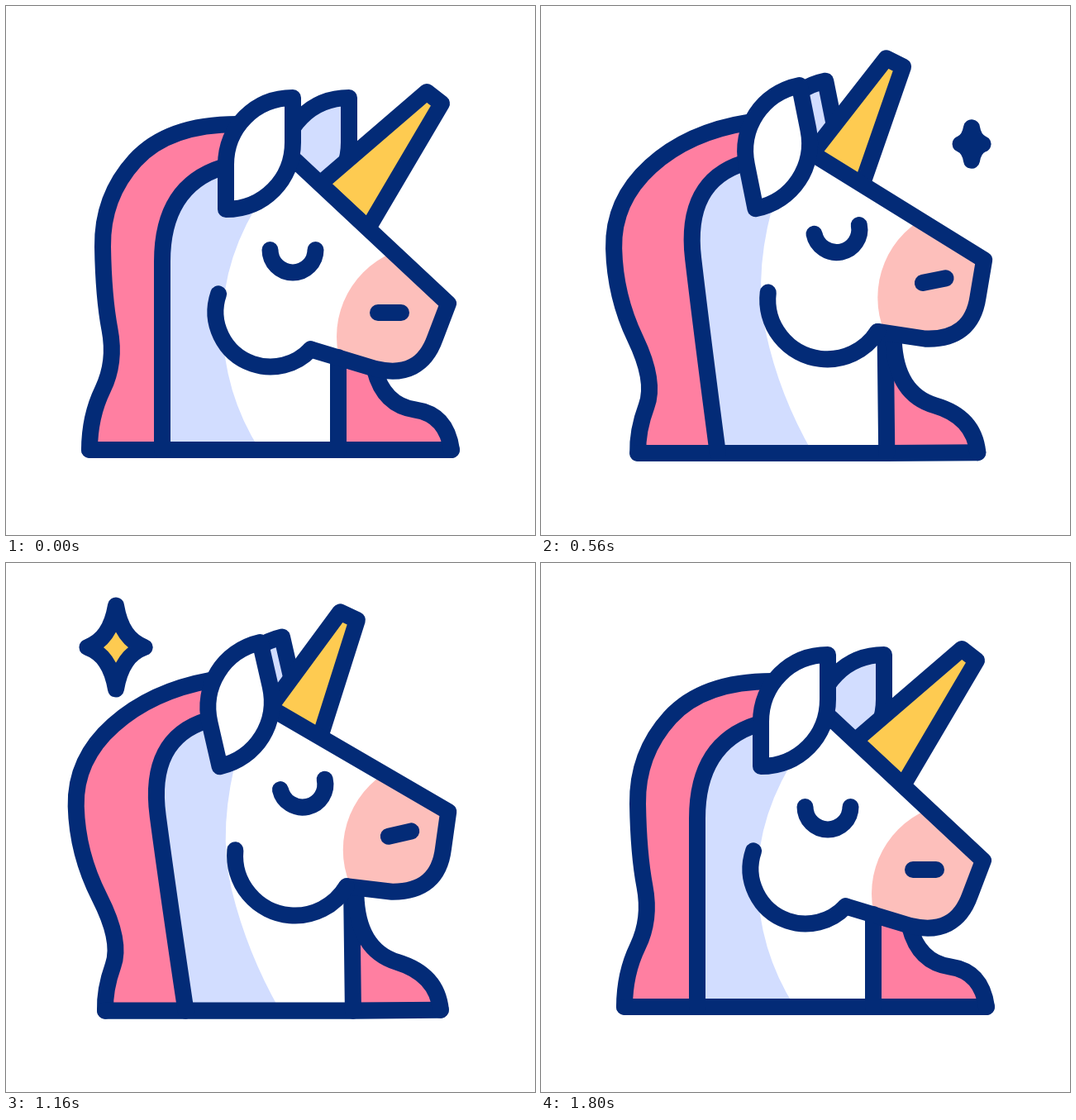
Recreate the animation shown at these times as an HTML page with a canvas. Size 640x640 px, loop 2400 ms.

```html
<!DOCTYPE html>
<html lang="en">
<head>
<meta charset="utf-8">
<title>Unicorn</title>
<style>
  html, body { margin: 0; width: 100%; height: 100%; overflow: hidden; background: #fff; }
  canvas { display: block; width: 640px; height: 640px; }
</style>
</head>
<body>
<canvas id="stage"></canvas>
<script>
const LOOP = 2400, STEP = 20, TILT = -14;
const NAVY = '#032b77', PINK = '#ff7fa1', ICE = '#d2ddff',
      BLUSH = '#fdbfbb', GOLD = '#fecb51', WHITE = '#fff';

// Soft parts: control points as x, y and how far each moves when the head is up.
const MANE = [[280, 143, -35, 0], [196, 143, -21, 14], [116, 231, -35, 8], [118, 352, -34, 0],
              [133, 431, 8, 29], [101, 497, 20, 21], [101, 537, 21, 5]];
const NECK = [[189, 537, 31, 5], [189, 400, 8, 0], [189, 218, -19, -5], [262, 195, -20, -4]];
const SHADE = [[314, 225, -34, -3], [261, 303, -7, 19], [263, 468, 31, 4], [307, 537, 26, 4]];
const LOCK = [[446, 440, -25, -42], [457, 483, -35, -16], [533, 494, -13, 4], [539, 537, -15, 4]];
const THROAT = [[402, 425, 17, -34], [402, 537, 19, 5]];

// Rigid parts
const LEAF = new Path2D('M347 111V165C347 210 312 246 266 246V192C266 147 301 111 347 111Z');
const HORN = new Path2D('M380 215L509 104L527 118L438 269Z');
const EYE = new Path2D('M319.5 295A27.5 27.5 0 0 0 374.5 295');
const NOSTRIL = new Path2D('M450 371H478');
const MUZZLE = new Path2D('M350 187L535 360L519 402Q501 452 447 439');

const canvas = document.getElementById('stage');
const ctx = canvas.getContext('2d');
const dpr = window.devicePixelRatio || 1;
canvas.width = canvas.height = 640 * dpr;

const lerp = (a, b, p) => a + (b - a) * p;
const rad = deg => deg * Math.PI / 180;
const ease = u => (1 - Math.cos(Math.PI * Math.min(1, Math.max(0, u)))) / 2;

// Eases up over `rise` ms, holds, then eases down over `fall` ms.
const swell = (t, rise, hold, fall) =>
  t < rise + hold ? ease(t / rise) : 1 - ease((t - rise - hold) / fall);

const moved = (pts, p) => pts.map(([x, y, dx, dy]) => [x + dx * p, y + dy * p]);

// Smooth chain of quadratics; continues `path` with a line if one is given.
function curve(pts, path = new Path2D()) {
  const last = pts.length - 1;
  path.lineTo(...pts[0]);
  for (let i = 1; i < last; i++) {
    const [x, y] = pts[i], [nx, ny] = pts[i + 1];
    if (i === last - 1) path.quadraticCurveTo(x, y, nx, ny);
    else path.quadraticCurveTo(x, y, (x + nx) / 2, (y + ny) / 2);
  }
  return path;
}

function poly(pts, path = new Path2D()) {
  for (const pt of pts) path.lineTo(...pt);
  return path;
}

function paint(path, fill, line = true) {
  if (fill) { ctx.fillStyle = fill; ctx.fill(path); }
  if (line) ctx.stroke(path);
}

// Tilts with the head about a pivot that travels between two points.
function tilted(p, from, to) {
  return new DOMMatrix()
    .translate(lerp(from[0], to[0], p), lerp(from[1], to[1], p))
    .rotate(TILT * p)
    .translate(-from[0], -from[1]);
}

function place(path, matrix) {
  const out = new Path2D();
  out.addPath(path, matrix);
  return out;
}

function star(age, x, y) {
  if (age < -20 || age > 720) return;
  const s = lerp(0.14, 1, swell(age, 380, 0, 340));
  const tip = i => [37 * s * Math.sin(i * Math.PI / 2), -54 * s * Math.cos(i * Math.PI / 2)];
  const path = new Path2D();
  for (let i = 0; i < 4; i++) {
    const [ax, ay] = tip(i), [bx, by] = tip(i + 1);
    const at = (a, b) => [x + a * ax + b * bx, y + a * ay + b * by];
    path.lineTo(...at(1, 0));
    path.bezierCurveTo(...at(0.45, 0.14), ...at(0.14, 0.45), ...at(0, 1));
  }
  path.closePath();
  paint(path, GOLD);
}

function unicorn(p) {
  const [mane, neck, shade, lock, throat] =
    [MANE, NECK, SHADE, LOCK, THROAT].map(pts => moved(pts, p));

  // The jaw runs into the lower end of the cheek arc.
  const r = lerp(66.5, 73, p), cx = lerp(320, 352, p), cy = lerp(370, 353, p);
  const from = rad(199 - 15 * p), to = rad(43 - 13 * p);
  const cheek = new Path2D();
  cheek.arc(cx, cy, r, from, to, true);
  const jaw = [cx + r * Math.cos(to), cy + r * Math.sin(to)];

  const tilt = tilted(p, [535, 360], [534.5, 296.5]);
  const brow = tilt.transformPoint({ x: 350, y: 187 });
  const nose = tilt.transformPoint({ x: 535, y: 360 });
  const head = poly([jaw], place(MUZZLE, tilt));

  // Behind the head
  paint(place(LEAF, tilted(p, [415, 111], [327, 89]).translate(68, 0)), ICE);
  paint(place(HORN, tilted(p, [509, 104], [395, 57])), GOLD);
  paint(poly([neck[0]], curve(mane)), PINK, false);
  paint(poly([throat[1], throat[0]], curve(lock)), PINK, false);

  // Head and neck colours
  const body = poly([[brow.x, brow.y], [nose.x, nose.y], jaw, ...throat], curve(neck));
  paint(body, WHITE, false);
  paint(head, WHITE, false);
  paint(curve(shade, curve(neck)), ICE, false);
  const blush = new Path2D();
  blush.arc(lerp(510, 518, p), lerp(400, 343, p), 110, 0, 7);
  ctx.save();
  ctx.clip(head);
  paint(blush, BLUSH, false);
  ctx.restore();

  // Outlines
  const base = poly([mane[mane.length - 1], neck[0], throat[1], lock[lock.length - 1]]);
  for (const path of [curve(mane), base, curve(neck), poly(throat), curve(lock), head, cheek]) {
    paint(path);
  }
  paint(place(EYE, tilted(p, [347, 295], [359.5, 266.5])));
  paint(place(NOSTRIL, tilted(p, [464, 371], [477, 324.5])));
  paint(place(LEAF, tilted(p, [266, 246], [258, 247])), WHITE);
}

function draw(t) {
  ctx.setTransform(dpr, 0, 0, dpr, 0, 0);
  ctx.fillStyle = WHITE;
  ctx.fillRect(0, 0, 640, 640);
  ctx.strokeStyle = NAVY;
  ctx.lineWidth = 20;
  ctx.lineCap = ctx.lineJoin = 'round';

  // Halfway through a nod the figure swells a little from its foot.
  const p = 1.02 * swell(t, 800, 200, 800);
  const grow = 1 + 0.036 * p * Math.max(0, 1 - p);
  ctx.save();
  ctx.translate(260, 540);
  ctx.scale(grow, grow);
  ctx.translate(-260, -540);
  unicorn(p);
  ctx.restore();

  star(t - 430, 521, 167);
  star(t - 720, 133, 102);
}

const begin = performance.now();
function tick() {
  const t = (performance.now() - begin) % LOOP;
  draw(Math.floor(t / STEP) * STEP);
  requestAnimationFrame(tick);
}
tick();
</script>
</body>
</html>
```
